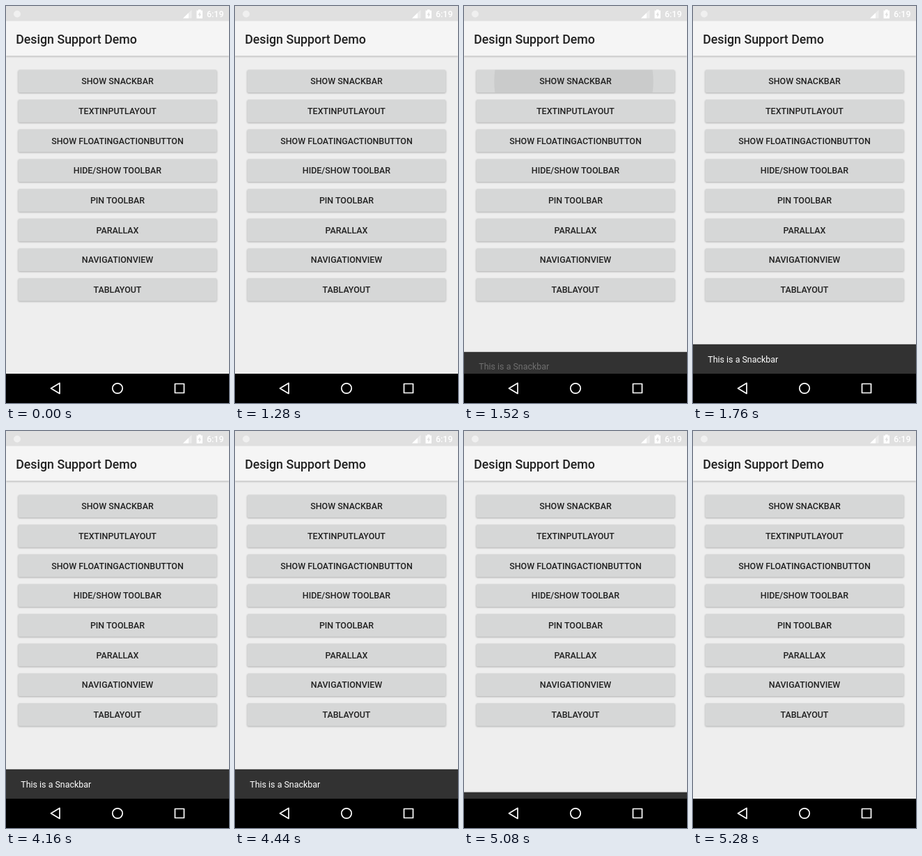
An HTML page for the animation above (6.44 s loop, 320x569 px).

```html
<!DOCTYPE html>
<html lang="en">
<head>
<meta charset="utf-8">
<title>Snackbar demo</title>
<style>
  html, body { margin: 0; width: 100%; height: 100%; overflow: hidden; background: #eee; }
  svg { display: block; width: 100%; height: 100%; font: 12.44px Roboto, sans-serif; }
  .title { font-size: 17.78px; font-weight: 500; fill: #212121; }
  .label { font-weight: 500; text-anchor: middle; fill: #212121; }
  .raised { filter: drop-shadow(0 1px .8px rgba(0, 0, 0, .27)); }
  .nav { fill: none; stroke: #fff; stroke-width: 1.7; stroke-linejoin: round; }
</style>
</head>
<body>
<svg viewBox="0 0 320 569">
  <clipPath id="face"><rect x="17.5" y="91.5" width="285" height="32.5" rx="2"/></clipPath>
  <rect width="320" height="569" fill="#eee"/>

  <!-- App bar and status bar -->
  <rect class="raised" y="21" width="320" height="50.5" fill="#f5f5f5"/>
  <rect width="320" height="21.5" fill="#e0e0e0"/>
  <text class="title" x="14.2" y="54">Design Support Demo</text>
  <circle cx="16" cy="11.5" r="5" fill="#fff" opacity=".5"/>
  <g fill="#fff">
    <path d="M254 17.5L266.5 5.5V17.5Z" opacity=".4"/>
    <path d="M254 17.5L262 10V17.5Z"/>
    <path d="M273.5 6.5H276V5H279.5V6.5H282V17.8H273.5Z"/>
    <text x="288" y="16" font-weight="500">6:19</text>
  </g>
  <path d="M278.5 8L275.5 12.8H277.3V16.2L280.2 11.4H278.5Z" fill="#e0e0e0"/>

  <g id="buttons"></g>
  <circle id="ripple" cx="157.5" cy="108" clip-path="url(#face)"/>
  <g id="labels"></g>

  <g id="bar">
    <rect y="484" width="320" height="1" fill="#000" opacity=".14"/>
    <rect y="485" width="320" height="43" fill="#323232"/>
    <text id="message" x="21.3" y="510.5" fill="#fff">This is a Snackbar</text>
  </g>

  <rect y="527" width="320" height="42" fill="#000"/>
  <g class="nav">
    <path d="M77 540.5V555.5L64.5 548Z"/>
    <circle cx="160" cy="548" r="7.2"/>
    <rect x="242.5" y="541.5" width="13" height="13"/>
  </g>
</svg>
<script>
const LOOP = 6440, SLIDE = 390, SHOW = 1335, HIDE = 4890, TOUCH = 1270, BAR_HEIGHT = 43;
const names = ['SHOW SNACKBAR', 'TEXTINPUTLAYOUT', 'SHOW FLOATINGACTIONBUTTON', 'HIDE/SHOW TOOLBAR',
  'PIN TOOLBAR', 'PARALLAX', 'NAVIGATIONVIEW', 'TABLAYOUT'];
const el = id => document.getElementById(id);
const clamp = v => Math.min(1, Math.max(0, v));

names.forEach((name, i) => {
  const y = 42.67 * i;
  el('buttons').innerHTML +=
    `<rect class="raised" x="17.5" y="${91.5 + y}" width="285" height="32.5" rx="2" fill="#d6d7d7"/>`;
  el('labels').innerHTML += `<text class="label" x="160" y="${112.3 + y}">${name}</text>`;
});

// Cubic Bézier (.4, 0, .2, 1), solved for x by bisection
function ease(x) {
  if (x <= 0 || x >= 1) return clamp(x);
  let lo = 0, hi = 1, u;
  for (let i = 0; i < 20; i++) {
    u = (lo + hi) / 2;
    const bx = 1.2 * u * (1 - u) ** 2 + .6 * u * u * (1 - u) + u ** 3;
    if (bx < x) lo = u; else hi = u;
  }
  return u * u * (3 - 2 * u);
}

function draw(t) {
  const shown = clamp((t - SHOW) / SLIDE), hidden = clamp((t - HIDE) / SLIDE);
  const visible = shown > 0 && hidden < 1;
  el('bar').setAttribute('visibility', visible ? 'visible' : 'hidden');
  el('bar').setAttribute('transform', `translate(0 ${BAR_HEIGHT * (1 - ease(shown) + ease(hidden))})`);
  el('message').setAttribute('opacity', ease((shown - .28) / .72) * (1 - ease(hidden / .72)));

  const age = t - TOUCH;
  el('ripple').setAttribute('r', Math.max(0, Math.min(155, age * .455)));
  el('ripple').setAttribute('opacity', .07 * clamp(age / 80) * clamp((1750 - t) / 300));
}

const start = performance.now();
function tick() {
  draw((performance.now() - start) % LOOP);
  requestAnimationFrame(tick);
}
tick();
</script>
</body>
</html>
```
